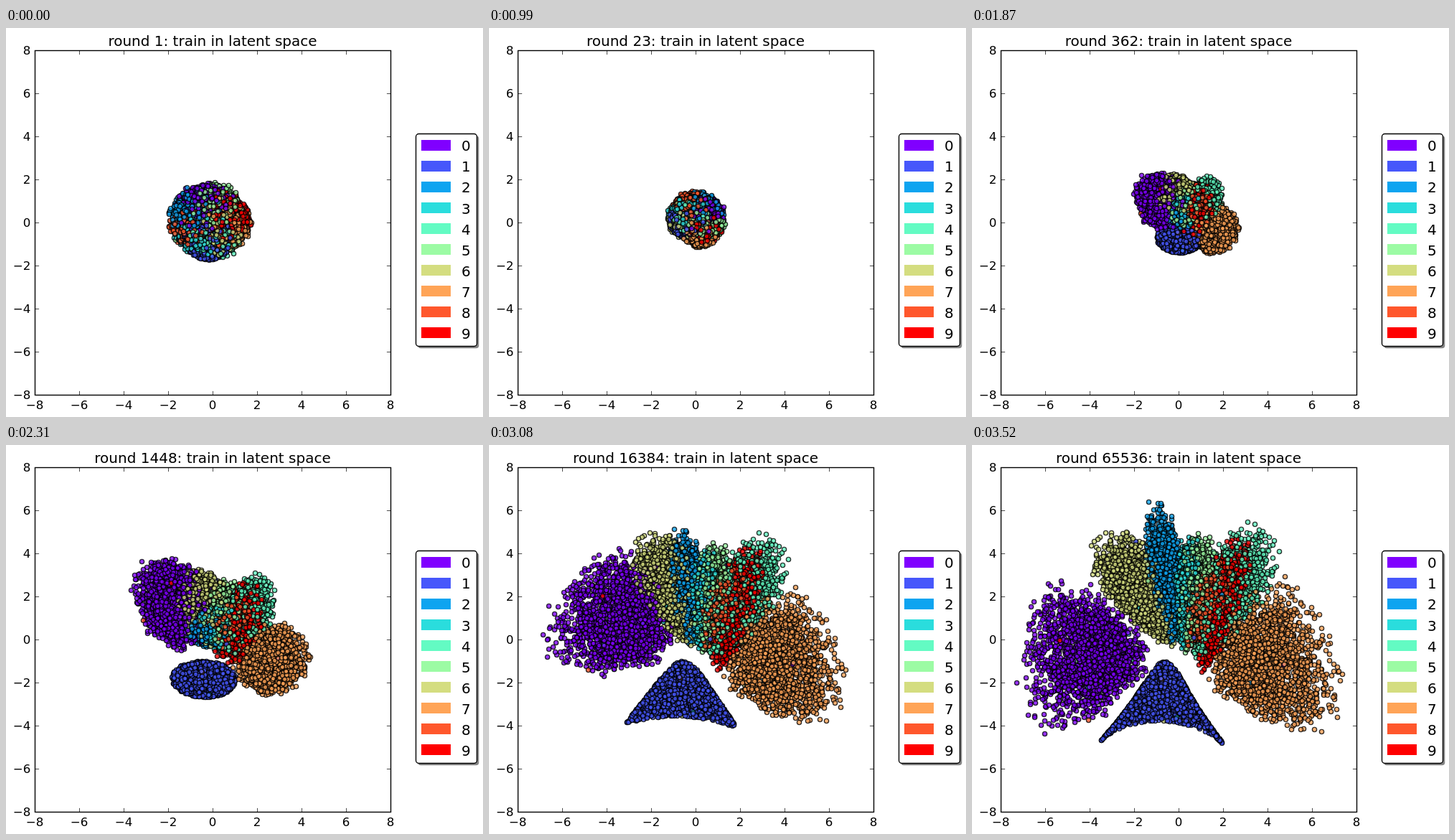
An HTML page with a canvas that plays this animation: 665 by 542 pixels, repeating every 3.63 s.

```html
<!DOCTYPE html>
<html lang="en">
<head>
<meta charset="utf-8">
<title>Latent space training</title>
<style>
  html, body { margin: 0; width: 100%; height: 100%; overflow: hidden; background: #fff; }
  canvas, svg { position: absolute; left: 0; top: 0; width: 665px; height: 542px; display: block; }
  text { font-family: "DejaVu Sans", sans-serif; font-size: 16.67px; fill: #000; }
  .big { font-size: 20px; }
</style>
</head>
<body>
<canvas id="cloud" width="665" height="542"></canvas>
<svg id="chart" viewBox="0 0 665 542">
  <text id="title" class="big" x="288" y="25" text-anchor="middle"></text>
</svg>
<script>
const LOOP = 3630, FIRST = 220, STEP = 110;
const POINTS = 20000;
const SETTLE = 5, OPEN = 20, LAST = 31; // steps where the blob stretches, the fan opens, the run ends

const px = x => 288.5 + 31 * x;
const py = y => 271.5 - 30 * y;
const lerp = (a, b, t) => a + (b - a) * t;
const clamp = (v, lo, hi) => Math.min(hi, Math.max(lo, v));
const progress = (k, from, to) => clamp((k - from) / (to - from), 0, 1);
const radians = deg => deg * Math.PI / 180;

// rainbow colour map
const colors = Array.from({ length: 10 }, (_, i) => {
  const x = i / 9;
  const rgb = [Math.abs(2 * x - 0.5), Math.sin(Math.PI * x), Math.cos(Math.PI * x / 2)];
  return `rgb(${rgb.map(v => Math.round(255 * clamp(v, 0, 1))).join(",")})`;
});

// ---------- axes and legend ----------
const chart = document.getElementById("chart");
const title = document.getElementById("title");

function add(tag, attrs, content) {
  const el = document.createElementNS("http://www.w3.org/2000/svg", tag);
  for (const name in attrs) el.setAttribute(name, attrs[name]);
  if (content !== undefined) el.textContent = content;
  chart.appendChild(el);
}

function drawAxes() {
  add("rect", { x: 40.5, y: 31.5, width: 496, height: 480, fill: "none", stroke: "#000", "stroke-width": 1.39 });
  let ticks = "";
  for (let v = -8; v <= 8; v += 2) {
    const x = px(v), y = py(v), label = String(v).replace("-", "\u2212");
    ticks += `M${x} 31.5v5.6M${x} 511.5v-5.6M40.5 ${y}h5.6M536.5 ${y}h-5.6`;
    add("text", { x: x - 0.5, y: 531, "text-anchor": "middle" }, label);
    add("text", { x: 34.4, y: y + 5.5, "text-anchor": "end" }, label);
  }
  add("path", { d: ticks, stroke: "#000", "stroke-width": 0.7 });
}

function drawLegend() {
  const box = { x: 571.5, y: 147.5, width: 85, height: 296, rx: 4 };
  add("rect", { ...box, x: 574.3, y: 150.3, fill: "#858585" });
  add("rect", { ...box, fill: "#fff", stroke: "#000", "stroke-width": 1.39 });
  colors.forEach((color, i) => {
    const baseline = Math.round(171.25 + 29.1 * i);
    add("rect", { x: 579, y: 156 + 29 * i, width: 41, height: 15, fill: color });
    add("text", { class: "big", x: 635, y: baseline }, i);
  });
}

// ---------- clusters ----------
// heading: place in the early blob; tip, angle, reach, width: the final wedge
const wedges = [
  { heading: 100, tip: -0.8, angle: 180, reach: 5.5, width: 2.5, pace: 0.5 },
  { heading: 270, tip: -0.6, angle: 268, reach: 2.7, width: 2.3, curl: 1.9 },
  { heading: 150, tip: -0.2, angle: 96, reach: 6.1, width: 0.6, pace: 2.5 },
  { heading: 250, tip: 0.1, angle: 86, reach: 4.8, width: 0.45, pace: 1.5 },
  { heading: 280, tip: 0.5, angle: 64, reach: 6.4, width: 1.1 },
  { heading: 60, tip: 0.2, angle: 82, reach: 5, width: 0.6 },
  { heading: 300, tip: -0.1, angle: 120, reach: 5.6, width: 1 },
  { heading: -5, tip: 1, angle: 19, reach: 5.3, width: 2.7 },
  { heading: 215, tip: 0.1, angle: 66, reach: 4.2, width: 0.7 },
  { heading: 20, tip: 0.9, angle: 74, reach: 6, width: 0.65 }
];

// a round, mixed blob that turns, wanders and shrinks
function blobAt({ heading }, k) {
  const radius = 1.65 - 0.06 * k;
  const turn = radians(heading + 33 * k);
  return {
    x: 0.15 - 0.35 * Math.cos(Math.PI * k / 5) + 0.35 * radius * Math.cos(turn),
    y: 0.02 * k + 0.35 * radius * Math.sin(turn),
    a: 0.65 * radius, b: 0.65 * radius, taper: 0, curl: 0
  };
}

// a wedge that points away from the middle; the left ones swing outwards
function wedgeAt({ tip, angle, reach, width, pace = 1, curl = 0 }, k) {
  const p = progress(k, OPEN, LAST);
  const size = lerp(0.6, 1, Math.sqrt(p));
  const swing = angle > 90 && angle <= 180 ? lerp(0.3, 1, p ** 1.5) : 1;
  const dir = radians(90 + (angle - 90) * swing);
  const a = reach * size ** pace / 2;
  const tipX = tip * size;
  const tipY = -0.7 - 1.4 * Math.max(0, tipX);
  return {
    x: tipX + (0.3 + a) * Math.cos(dir),
    y: tipY + (0.3 + a) * Math.sin(dir),
    a, b: lerp(0.7 + 0.28 * width, width, Math.sqrt(p)),
    taper: 0.5 * Math.sqrt(p), curl: curl * p, dir
  };
}

function clusterAt(wedge, k) {
  const early = blobAt(wedge, Math.min(k, OPEN));
  const late = wedgeAt(wedge, k);
  const t = progress(k, SETTLE, OPEN) ** 2;
  const mix = { cos: Math.cos(late.dir), sin: Math.sin(late.dir) };
  for (const name in early) mix[name] = lerp(early[name], late[name], t);
  return mix;
}

// ---------- points ----------
function seeded(seed) {
  return () => {
    seed = (seed + 0x6D2B79F5) | 0;
    let n = Math.imul(seed ^ (seed >>> 15), 1 | seed);
    n = (n + Math.imul(n ^ (n >>> 7), 61 | n)) ^ n;
    return ((n ^ (n >>> 14)) >>> 0) / 4294967296;
  };
}

const rand = seeded(65536);
const points = Array.from({ length: POINTS }, () => {
  const c = Math.floor(rand() * 10);
  const [rim, fade] = wedges[c].curl ? [1.07, 1.2] : [1.35, 3];
  const angle = rand() * 2 * Math.PI;
  const r = rim * Math.sqrt(1 - rand() ** (1 / fade));
  const u = r * Math.cos(angle);
  return {
    c,
    color: rand() < 0.008 ? Math.floor(rand() * 10) : c,
    u: u < 0 ? u / rim : u, // keeps the inner side sharp
    v: r * Math.sin(angle)
  };
});

const dots = colors.map(color => {
  const dot = document.createElement("canvas");
  dot.width = dot.height = 9;
  const g = dot.getContext("2d");
  g.globalAlpha = 0.8;
  g.fillStyle = color;
  g.lineWidth = 1.39;
  g.arc(4.5, 4.5, 3.1, 0, 2 * Math.PI);
  g.fill();
  g.stroke();
  return dot;
});

const ctx = document.getElementById("cloud").getContext("2d");

function drawCloud(k) {
  const clusters = wedges.map(wedge => clusterAt(wedge, k));
  ctx.clearRect(0, 0, 665, 542);
  for (const { c, color, u, v } of points) {
    const q = clusters[c];
    const along = u * q.a + q.curl * v * v;
    const across = v * q.b * (1 + q.taper * u);
    const x = q.x + along * q.cos - across * q.sin;
    const y = q.y + along * q.sin + across * q.cos;
    ctx.drawImage(dots[color], Math.round(px(x) - 4.5), Math.round(py(y) - 4.5));
  }
}

// ---------- playback ----------
let shown = -1;

function render(time) {
  const t = time % LOOP;
  const k = t < FIRST ? 0 : Math.floor((t - FIRST) / STEP) + 1;
  if (k === shown) return;
  shown = k;
  const round = k ? Math.round(2 ** ((k + 1) / 2)) : 1;
  title.textContent = `round ${round}: train in latent space`;
  drawCloud(k);
}

function tick() {
  render(performance.now());
  requestAnimationFrame(tick);
}

drawAxes();
drawLegend();
render(0);
requestAnimationFrame(tick);
</script>
</body>
</html>
```
